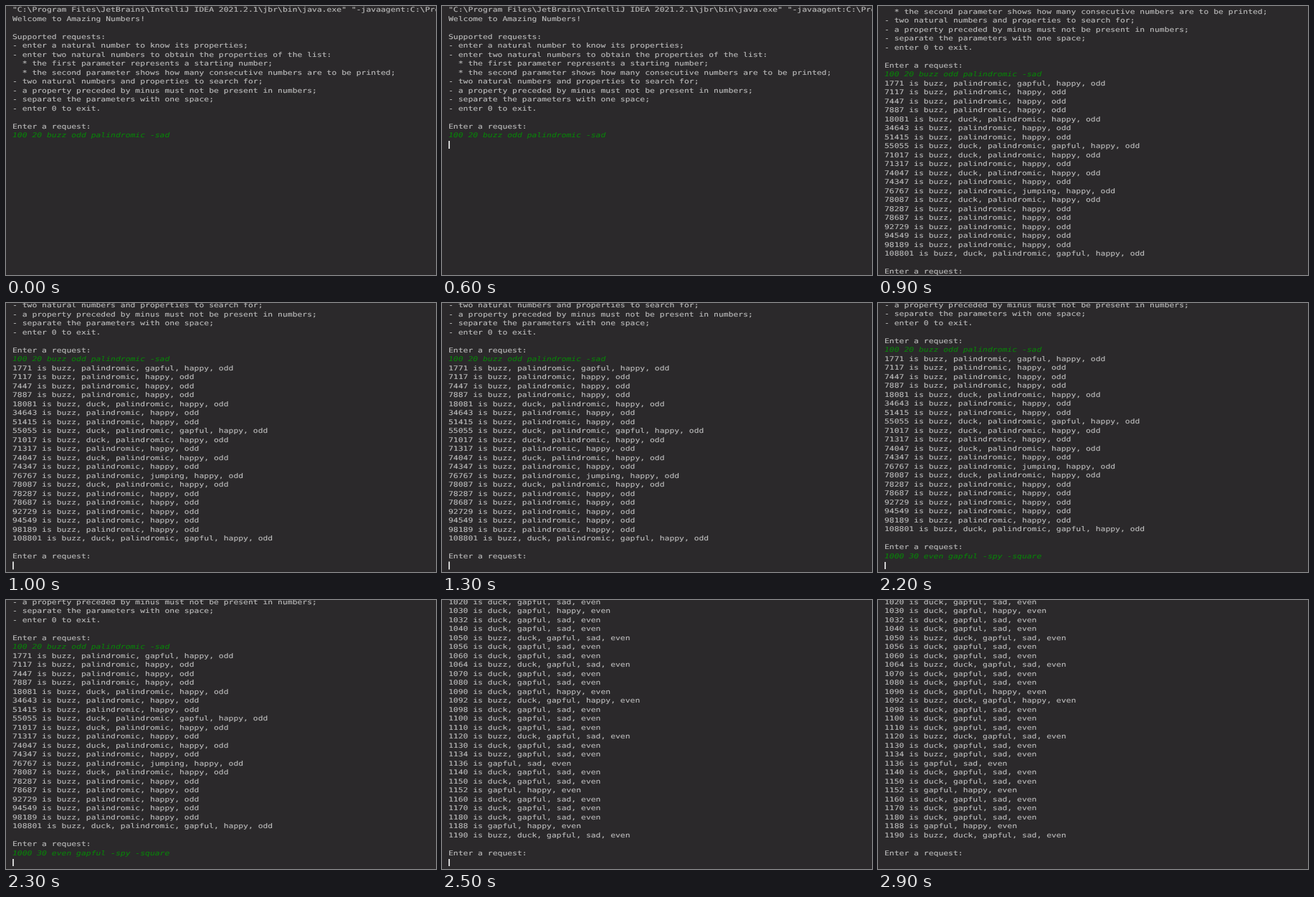
Write an HTML page that moves like this. It is 600 by 375 pixels and loops after 3400 ms.

```html
<!DOCTYPE html>
<html lang="en">
<head>
<meta charset="utf-8">
<style>
html, body { margin: 0; width: 100%; height: 100%; overflow: hidden; background: #2b292b; }
#stage { position: relative; width: 600px; height: 375px; overflow: hidden; }
#view { position: absolute; left: 8.5px; top: -0.4px; }
pre {
  margin: 0; color: #bbb; transform: scaleX(1.239); transform-origin: 0 0;
  font: 9.2px/12.5px "DejaVu Sans Mono", monospace;
  text-rendering: geometricPrecision; font-variant-ligatures: none;
  -webkit-text-stroke: 0.12px;
}
i { color: #0b800b; }
#caret { position: absolute; width: 2px; height: 10.5px; background: #d0d0d0; }
</style>
</head>
<body>
<div id="stage"><div id="view"><pre id="text"></pre><div id="caret"></div></div></div>
<script>
const LINE = 12.5, CHAR = 6.86, LOOP = 3400, BOTTOM = 360;
const $ = id => document.getElementById(id);
const digits = n => [...String(n)].map(Number);

// Every sad number passes through 89
function isHappy(n) {
  while (n !== 1 && n !== 89) n = digits(n).reduce((sum, d) => sum + d * d, 0);
  return n === 1;
}

const tests = {
  buzz: n => n % 7 === 0 || n % 10 === 7,
  duck: n => digits(n).includes(0),
  palindromic: n => digits(n).reverse().join("") === String(n),
  gapful: n => n % (digits(n)[0] * 10 + n % 10) === 0,
  jumping: n => digits(n).every((d, i, all) => !i || Math.abs(d - all[i - 1]) === 1),
  happy: isHappy,
  sad: n => !isHappy(n),
  even: n => n % 2 === 0,
  odd: n => n % 2 === 1
};

function search(start, count, ...wanted) {
  const found = [];
  for (let n = start; found.length < count; n++) {
    if (!wanted.every(name => tests[name](n))) continue;
    const names = Object.keys(tests).filter(name => tests[name](n));
    found.push(`${n} is ${names.join(", ")}`);
  }
  return found;
}

const intro = String.raw`"C:\Program Files\JetBrains\IntelliJ IDEA 2021.2.1\jbr\bin\java.exe" "-javaagent:C:\Program Files
Welcome to Amazing Numbers!

Supported requests:
- enter a natural number to know its properties;
- enter two natural numbers to obtain the properties of the list:
  * the first parameter represents a starting number;
  * the second parameter shows how many consecutive numbers are to be printed;
- two natural numbers and properties to search for;
- a property preceded by minus must not be present in numbers;
- separate the parameters with one space;
- enter 0 to exit.`.split("\n");

const prompt = ["", "Enter a request:"];
const first = "100 20 buzz odd palindromic -sad";
const second = "1000 30 even gapful -spy -square";

const lines = [...intro, ...prompt];
const add = (...more) => lines.push(...more);  // returns the row after the last line
const firstSent = add(`<i>${first}</i>`);
const firstDone = add(...search(100, 20, "buzz", "odd", "palindromic", "happy"), ...prompt);
const secondSent = add(`<i>${second}</i>`);
const secondDone = add(...search(1000, 30, "even", "gapful"), ...prompt);

const steps = [
  { at: 0, row: firstSent, hidden: true },
  { at: 600, row: firstSent },
  { at: 900, row: firstDone, hidden: true, lag: 17.5 },
  { at: 1000, row: firstDone },
  { at: 1700, row: firstDone, typed: second },
  { at: 2200, row: secondSent },
  { at: 2500, row: secondDone },
  { at: 2900, row: secondDone, hidden: true }
];

let current;
function show({ row, hidden, lag = 0, typed = "" }) {
  const scroll = Math.max(0, row * LINE - BOTTOM - lag);
  $("text").innerHTML = lines.slice(0, typed ? row + 1 : row).join("\n");
  $("view").style.transform = `translateY(${-scroll}px)`;
  const caret = $("caret").style;
  caret.display = hidden ? "none" : "block";
  caret.left = typed.length * CHAR + "px";
  caret.top = 1 + row * LINE + "px";
}

function draw(now) {
  const step = steps.filter(s => s.at <= now % LOOP).pop();
  if (step !== current) show(current = step);
  requestAnimationFrame(draw);
}
draw(0);
</script>
</body>
</html>
```
